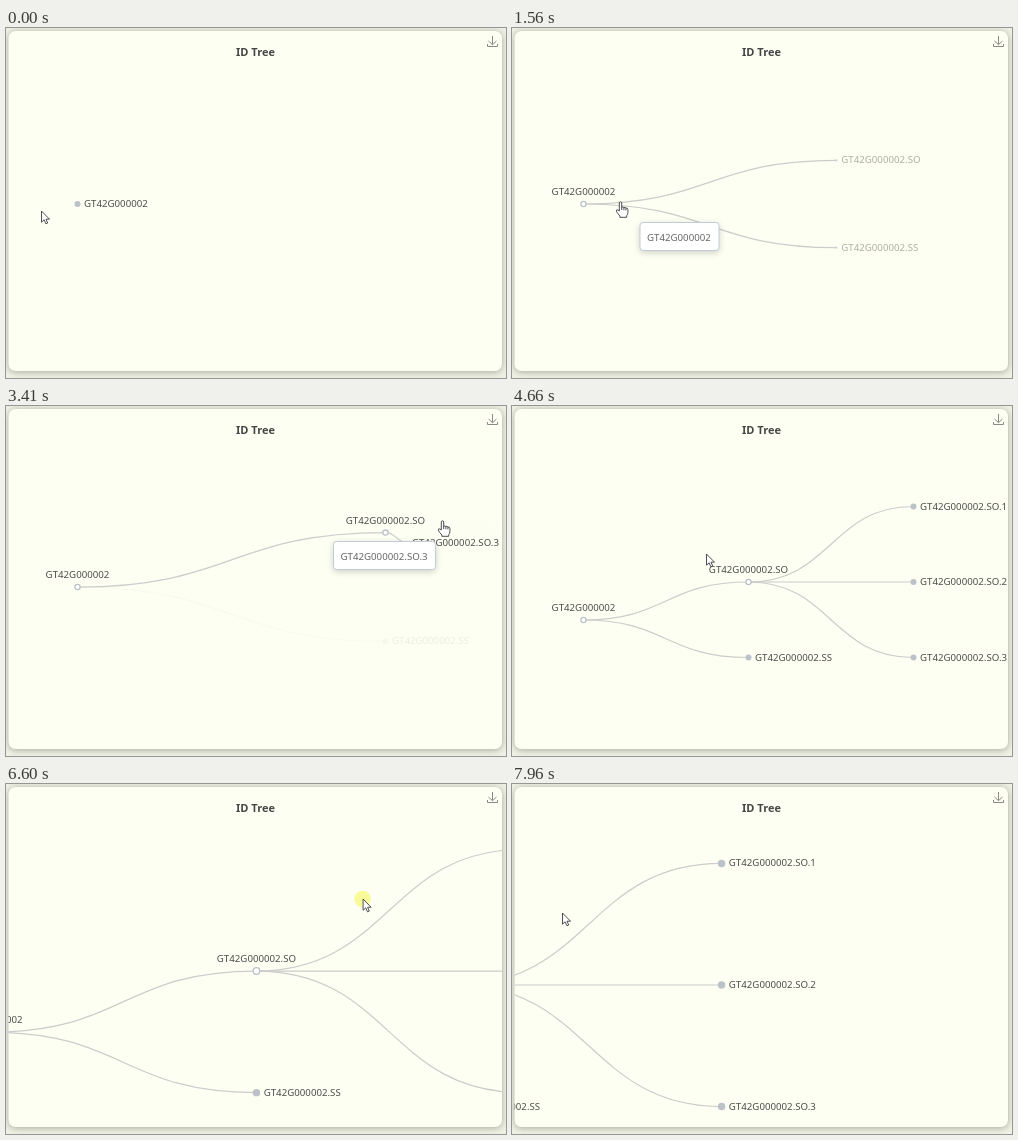
Write an HTML page with a canvas that moves like this. It is 500x350 px and loops after 8000 ms.

```html
<!DOCTYPE html>
<html lang="en">
<head>
<meta charset="utf-8">
<title>ID Tree</title>
<style>
  html, body { margin: 0; width: 500px; height: 350px; overflow: hidden; background: #f0f2e6; }
  canvas { display: block; }
</style>
</head>
<body>
<canvas id="stage" width="500" height="350"></canvas>
<script>
const ctx = document.getElementById('stage').getContext('2d');
const LOOP = 8000, FONT = '"Noto Sans", "Open Sans", sans-serif';
const ID = 'GT42G000002', CARD = '#fcfff1', LINE = '#cccdcb', NODE = '#bcc2ca', INK = '#4c4d4c';
const OPEN_ROOT = 1255, OPEN_SO = 3250, GROW = 500;
const PRESS = 6560, RELEASE = 7900;
const ZOOM_TIMES = [5000, 5200, 5400, 5650, 6050], ZOOM_AT = { x: 213, y: 158 };

// time, x, y of the pointer tip
const POINTER = [
  [50, 35, 183], [700, 108, 174], [1700, 108, 174], [2500, 436, 115], [4130, 436, 115],
  [4640, 194, 148], [4750, 194, 148], [4980, 213, 158], [5850, 213, 158], [6500, 357, 115],
  [6600, 357, 115], [7120, 152, 142], [7660, 64, 135], [7960, 50, 129]
];

const clamp = v => Math.min(1, Math.max(0, v));
const ramp = (t, start, length) => clamp((t - start) / length);
const cubicInOut = k => k < .5 ? 4 * k ** 3 : 1 - 4 * (1 - k) ** 3;
const smooth = k => k * k * (3 - 2 * k);
const pulse = (t, from, to, fade) => ramp(t, from, fade) * (1 - ramp(t, to, fade));

function pointerAt(t) {
  const next = POINTER.findIndex(key => key[0] > t);
  if (next < 1) {
    const [, x, y] = POINTER[next ? POINTER.length - 1 : 0];
    return { x, y };
  }
  const [t0, x0, y0] = POINTER[next - 1], [t1, x1, y1] = POINTER[next];
  const linear = (t - t0) / (t1 - t0), k = t0 < 6600 ? smooth(linear) : linear;
  return { x: x0 + (x1 - x0) * k, y: y0 + (y1 - y0) * k };
}

function text(str, x, y, color = INK, align = 'left', font = '9.7px ') {
  ctx.font = font + FONT;
  ctx.textAlign = align;
  ctx.textBaseline = 'alphabetic';
  ctx.fillStyle = color;
  ctx.fillText(str, x, y + 3.5);
}

function roundRect(x, y, w, h, r) {
  ctx.beginPath();
  ctx.roundRect(x, y, w, h, r);
}

function shadow(color, blur, dy) {
  ctx.shadowColor = color;
  ctx.shadowBlur = blur;
  ctx.shadowOffsetY = dy;
}

function drawCard() {
  ctx.fillStyle = '#f0f2e6';
  ctx.fillRect(0, 0, 500, 350);
  ctx.save();
  shadow('rgba(70,75,55,.45)', 7, 1);
  ctx.fillStyle = CARD;
  roundRect(2.5, 3, 493.5, 340, 7);
  ctx.fill();
  ctx.restore();
}

function drawHeader() {
  text('ID Tree', 249.5, 24.5, '#464646', 'center', 'bold 11px ');
  ctx.strokeStyle = '#888a85';
  ctx.lineWidth = 1;
  ctx.stroke(new Path2D('M486.5 8V16.5M482.5 13L486.5 16.7L490.5 13M481.5 16V18.5H491.5V16'));
}

function drawEdge(a, b, alpha = 1) {
  const mid = (a.x + b.x) / 2;
  ctx.globalAlpha = alpha;
  ctx.strokeStyle = LINE;
  ctx.lineWidth = 1.2;
  ctx.beginPath();
  ctx.moveTo(a.x, a.y);
  ctx.bezierCurveTo(mid, a.y, mid, b.y, b.x, b.y);
  ctx.stroke();
  ctx.globalAlpha = 1;
}

function drawNode(p, name, { open = false, alpha = 1, size = 1, zoom = 1 } = {}) {
  const r = 3 * size * (1 + (zoom - 1) * .4);
  ctx.globalAlpha = alpha;
  ctx.beginPath();
  ctx.arc(p.x, p.y, open ? r - .4 : r, 0, 7);
  ctx.fillStyle = open ? '#fff' : NODE;
  ctx.fill();
  if (open) {
    ctx.strokeStyle = NODE;
    ctx.lineWidth = 1.3;
    ctx.stroke();
    text(name, p.x, p.y - 12.5, INK, 'center');
  } else {
    text(name, p.x + r + 3.5, p.y - .5);
  }
  ctx.globalAlpha = 1;
}

function drawTree(t, pointer) {
  const p1 = cubicInOut(ramp(t, OPEN_ROOT, GROW)), p2 = cubicInOut(ramp(t, OPEN_SO, GROW));
  const zoom = 1.1 ** ZOOM_TIMES.filter(z => t >= z).length;
  const pan = t > 6600 ? { x: pointer.x - 357, y: pointer.y - 115 } : { x: 0, y: 0 };
  const place = (x, y) => ({
    x: ZOOM_AT.x + (x - ZOOM_AT.x) * zoom + pan.x,
    y: ZOOM_AT.y + (y - ZOOM_AT.y) * zoom + pan.y
  });
  const root = place(71.5, 176 + 38 * p2);
  if (t < OPEN_ROOT) return drawNode(root, ID);

  const x = 71.5 + 330 * p1 - 165 * p2;
  const so = place(x, 176 - 57 * p1 + 57 * p2), ss = place(x, 176 + 57 * p1 + 18.5 * p2);
  const blur = 1 - .9 * pulse(t, 2900, 4150, 250);
  const hidden = t < 4150 ? .1 * p2 : blur;
  const soOpen = t >= OPEN_SO, grown = p1 ** 3;
  const leaves = !soOpen ? [] : [100.5, 176, 251.5].map((y, i) => ({
    at: place(401.5, 119 + (y - 119) * p2), name: `${ID}.SO.${i + 1}`, alpha: i < 2 ? hidden : 1
  }));

  drawEdge(root, so);
  drawEdge(root, ss, blur);
  leaves.forEach(leaf => drawEdge(so, leaf.at, leaf.alpha));
  drawNode(root, ID, { open: true, zoom });
  drawNode(ss, ID + '.SS', { alpha: blur * grown, size: grown, zoom });
  drawNode(so, ID + '.SO', { open: soOpen, alpha: grown, size: grown, zoom });
  leaves.forEach(leaf => drawNode(leaf.at, leaf.name, {
    alpha: leaf.alpha, size: Math.max(.3, p2), zoom
  }));
}

function drawTooltip(name, x, y, w, alpha) {
  if (!alpha) return;
  ctx.save();
  ctx.globalAlpha = alpha;
  shadow('rgba(0,0,0,.2)', 7, 2);
  ctx.fillStyle = '#fff';
  roundRect(x, y, w, 28, 3);
  ctx.fill();
  shadow('transparent', 0, 0);
  ctx.strokeStyle = '#c3cad8';
  ctx.lineWidth = 1;
  ctx.stroke();
  text(name, x + 7, y + 14.5, '#666');
  ctx.restore();
}

function drawTooltips(t, pointer) {
  drawTooltip(ID, pointer.x + 20, pointer.y + 20.5, 79, pulse(t, 600, 1720, 150));
  const shown = pulse(t, 2480, 4170, 150);
  if (t < OPEN_SO) drawTooltip(ID + '.SO', 335, 135.5, 94, shown);
  else drawTooltip(ID + '.SO.3', 327.5, 135.5, 102, shown);
}

const ARROW = new Path2D('M0 0V11.2L2.6 8.8L4.4 12.8L6.2 12L4.5 8.2H8Z');
const HAND = new Path2D('M-1.2 9V1Q-1.2 -.2 0 -.2T1.2 1V5.2Q2.4 4.5 3.4 5.5Q4.6 4.9 5.4 6' +
  'Q7.4 5.8 7.4 7.6V10.5Q7.4 12.6 6.2 13.6V15.3H-.6V14Q-2.6 12 -4.2 9.2Q-4.4 7.4 -2.6 7.9Z');

function drawPointer(t, { x, y }) {
  const held = pulse(t, PRESS, RELEASE, 60);
  const hand = (t > 420 && t < 1740) || (t > 2400 && t < 4170);
  ctx.save();
  ctx.translate(x + .5, y);
  if (held) {
    ctx.globalAlpha = held;
    ctx.fillStyle = '#f8f86e';
    ctx.beginPath();
    ctx.arc(-.5, 0, 8.3, 0, 7);
    ctx.fill();
    ctx.globalAlpha = 1;
  }
  const shape = hand ? HAND : ARROW;
  ctx.fillStyle = '#fff';
  ctx.strokeStyle = '#3c3c44';
  ctx.lineWidth = .9;
  ctx.lineJoin = 'round';
  ctx.fill(shape);
  ctx.stroke(shape);
  if (hand) ctx.stroke(new Path2D('M1.2 5V8M3.4 5.6V8.2M5.4 6.2V8.4'));
  ctx.restore();
}

function render(t) {
  const pointer = pointerAt(t);
  drawCard();
  ctx.save();
  roundRect(2.5, 3, 493.5, 340, 7);
  ctx.clip();
  drawTree(t, pointer);
  drawHeader();
  drawTooltips(t, pointer);
  ctx.restore();
  drawPointer(t, pointer);
}

const start = performance.now();
function tick() {
  render((performance.now() - start) % LOOP);
  requestAnimationFrame(tick);
}
tick();
</script>
</body>
</html>
```
